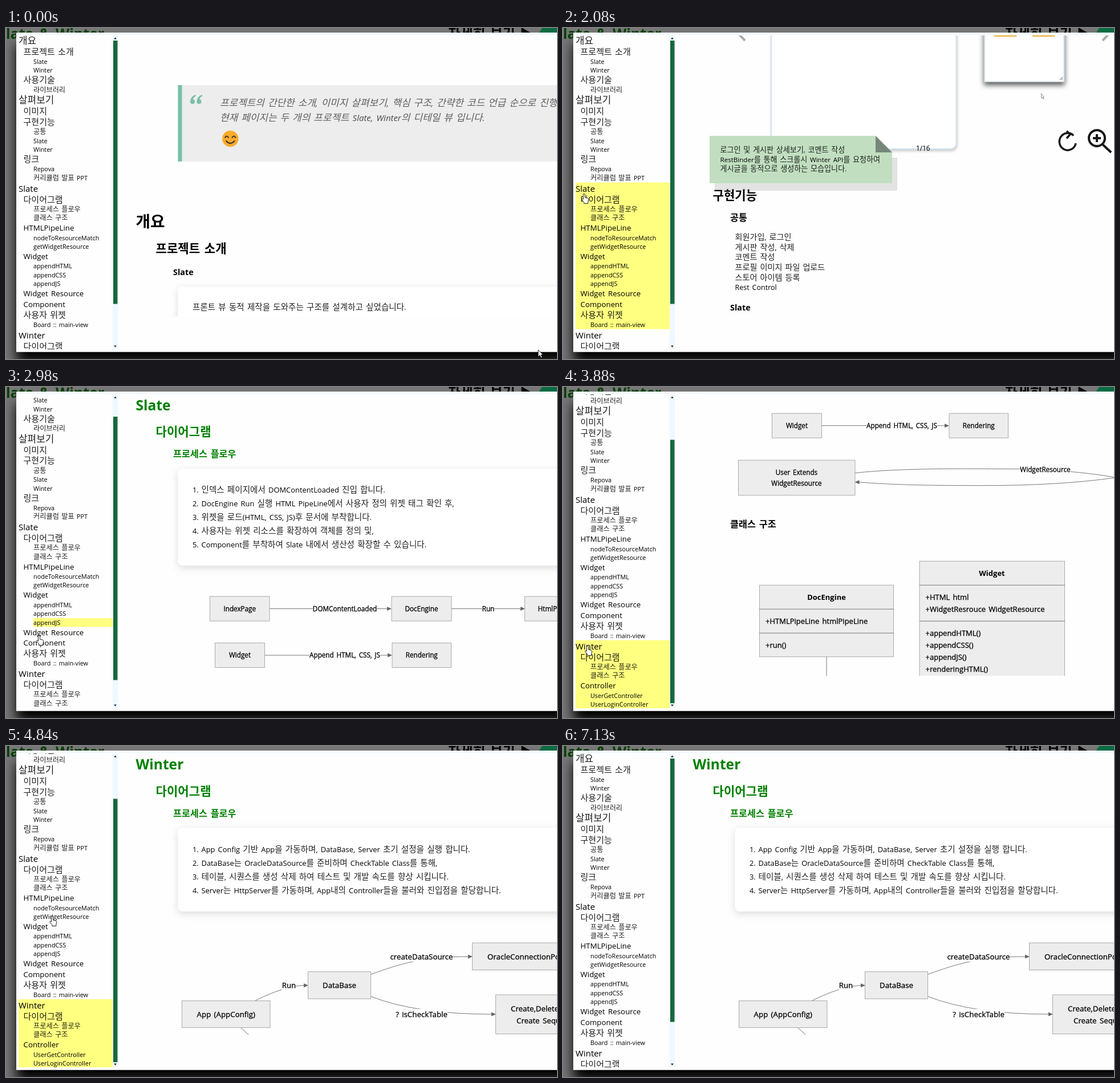
Recreate the animation shown at these times as an HTML page. Size 966x580 px, loop 7200 ms.

```html
<!DOCTYPE html>
<html lang="ko">
<head>
<meta charset="utf-8">
<style>
html, body { margin: 0; width: 100%; height: 100%; overflow: hidden; background: #777 }
svg { display: block; width: 966px; height: 580px }
text { font-family: "Open Sans", "Noto Sans", sans-serif; word-spacing: .14em; white-space: pre }
tspan { font-family: "Noto Sans CJK KR", "Noto Sans CJK", sans-serif; font-size: 1.13em }
text:not(.b) tspan { fill-opacity: .87 }
.b { font-weight: 700 }
.m { stroke: #000; stroke-width: .3px }
.q { font-style: italic; fill: #4a4a4a }
.mid { text-anchor: middle }
.green .head { fill: #008000 }
.card { fill: #fff; filter: drop-shadow(0 4px 7px #0002) }
.box { fill: #ededed; stroke: #aaa }
.line { fill: none; stroke: #777 }
.modal { fill: #fefefe; filter: drop-shadow(0 20px 11px #000) }
</style>
</head>
<body>
<svg id="stage" viewBox="0 0 966 580"></svg>
<script>
const LOOP = 7200, TICK = 72, ROW = [20.8, 18.7, 15.5], INDENT = [22, 30.5, 48], SIZE = [15, 13.3, 10.8];
const GALLERY = 1700, SLATE = 2500, WINTER = 7000;
const TO_SLATE = 1656, TO_WINTER = 3728;

const menu = `0개요|1프로젝트 소개|2Slate|2Winter|1사용기술|2라이브러리|0살펴보기|1이미지|1구현기능|2공통|2Slate|2Winter|1링크|2Repova|2커리큘럼 발표 PPT|0Slate|1다이어그램|2프로세스 플로우|2클래스 구조|1HTMLPipeLine|2nodeToResourceMatch|2getWidgetResource|1Widget|2appendHTML|2appendCSS|2appendJS|1Widget Resource|1Component|1사용자 위젯|2Board :: main-view|0Winter|1다이어그램|2프로세스 플로우|2클래스 구조|1Controller|2UserGetController|2UserLoginController`
  .split('|').map(s => ({ level: +s[0], label: s.slice(1) }));
let bottom = 11.6;
for (const m of menu) { m.top = bottom; bottom += ROW[m.level]; }
menu.forEach((m, i) => {
  const next = menu.slice(i + 1).find(n => n.level <= m.level);
  m.end = next ? next.top : bottom;
});

// y is the vertical middle of the line
const text = (x, y, size, s, cls = '') =>
  `<text x="${x}" y="${y + size * .37}" font-size="${size}" class="${cls}">${s.replace(/[가-힣]+/g, '<tspan>$&</tspan>')}</text>`;
const lines = (x, y, step, size, list, cls) => list.map((s, i) => text(x, y + i * step, size, s, cls)).join('');
const rect = (x, y, w, h, attr) => `<rect x="${x}" y="${y}" width="${w}" height="${h}" ${attr}/>`;
const path = (d, attr = 'class="line"') => `<path d="${d}" ${attr}/>`;
const group = (y, body, id = '') => `<g id="${id}" transform="translate(0 ${y})">${body}</g>`;
const h1 = (y, s) => text(227.5, y, 24.6, s, 'b head');
const h2 = (y, s) => text(262.5, y, 18.7, s, 'b head');
const h3 = (y, s) => text(293, y, 14.4, s, 'b head');
const card = (y, h) => rect(301.5, y, 760, h, 'rx="8" class="card"');
const node = (x, y, w, h, s = '', size = 11.7) =>
  rect(x, y, w, h, 'class="box"') + text(x + w / 2, y + h / 2, size, s, 'm mid');
const label = (x, y, s, size = 11.7) => text(x, y, size, s, 'm mid label');
const tip = (x, y, dir = 1) => path(`M${x} ${y}l${-8 * dir} -3.5v7z`, 'fill="#666"');
const steps = (y, list) => lines(327, y, 23.9, 12.9, list.map((_, i) => i + 1 + '.')) + lines(342.5, y, 23.9, 12.9, list);

const quoteMark = x => path(`M${x + 9} 117c-6 2-9 7-9 12a4 4 0 0 0 8 0a4 4 0 0 0-3.2-4q1-4 5.2-6z`, 'fill="#78c0a8"');

const intro = rect(301.5, 100, 700, 134, 'fill="#ededed"') + rect(301.5, 100, 7, 134, 'fill="#78c0a8"')
  + quoteMark(323) + quoteMark(334.5)
  + lines(375, 131, 26, 15, ['프로젝트의 간단한 소개, 이미지 살펴보기, 핵심 구조, 간략한 코드 언급 순으로 진행됩니다.',
    '현재 페이지는 두 개의 프로젝트 Slate, Winter의 디테일 뷰 입니다.'], 'q')
  + '<circle cx="393.3" cy="194" r="14.3" fill="#fcab2d"/>'
  + path('M384 192q3-5 6 0M396.500 192q3-5 6 0M386 198q7.300 8 14.600 0', 'fill="none" stroke="#3b3330" stroke-width="2" stroke-linecap="round"')
  + h1(340, '개요') + h2(387, '프로젝트 소개') + h3(428, 'Slate') + card(453, 110)
  + text(327, 489, 12.9, '프론트 뷰 동적 제작을 도와주는 구조를 설계하고 싶었습니다.')
  + h3(610, 'Winter') + card(635, 110) + h2(800, '사용기술') + h3(842, '라이브러리');

const gallery = h1(-400, '살펴보기') + h2(-352, '이미지')
  + rect(365, -300, 324.5, 512, 'rx="10" fill="#fff" stroke="#d3e2ee" stroke-width="2" style="filter:drop-shadow(1px 3px 2px #0003)"')
  + rect(739, -200, 139.5, 294, 'fill="#fff" stroke="#cfdde6" stroke-width="2" style="filter:drop-shadow(0 5px 5px #000a)"')
  + rect(755, -6, 41, 21, 'rx="3" fill="#f0a830"') + rect(822, -6, 41, 21, 'rx="3" fill="#f0a830"')
  + path('M871 91l5-5m-2 5l2-2', 'stroke="#555"')
  + path('M838.500 115v8l2-1.500 1.500 3 1-.5-1.500-3h2z', 'fill="#fff" stroke="#777" stroke-width=".8"')
  + path('M319 22L300 2 319-18M946 22L965 2 946-18', 'fill="none" stroke="#aaa" stroke-width="4"')
  + path('M895 188.500A14.500 15 0 1 0 899 202M883 180.500l6 6-6 7', 'fill="none" stroke="#161616" stroke-width="3.500"')
  + path('M946 204l15 14M936 186v14M929 193h14M950 193a14 14 0 1 0-28 0a14 14 0 1 0 28 0', 'fill="none" stroke="#161616" stroke-width="4"')
  + path('M577 227h9v58H266v-13h311z', 'fill="#e3e3e3"')
  + path('M257 189h291l29 29v54H257z', 'fill="#c1dfc0"') + path('M548 189l29 29h-29z', 'fill="#75877a"')
  + lines(275.5, 214, 16.3, 11.6, ['로그인 및 게시판 상세보기, 코멘트 작성', 'RestBinder를 통해 스크롤시 Winter API를 요청하여', '게시글을 동적으로 생성하는 모습입니다.'])
  + text(619, 211, 11.8, '1/16')
  + h2(294, '구현기능') + h3(333, '공통')
  + lines(301.5, 366.5, 17.6, 12.5, ['회원가입, 로그인', '게시판 작성, 삭제', '코멘트 작성', '프로필 이미지 파일 업로드', '스토어 아이템 등록', 'Rest Control'])
  + h3(490, 'Slate') + h3(590, 'Winter') + h2(690, '링크');

const slate = h1(31.5, 'Slate') + h2(79, '다이어그램') + h3(118, '프로세스 플로우') + card(143, 170)
  + steps(180.5, ['인덱스 페이지에서 DOMContentLoaded 진입 합니다.', 'DocEngine Run 실행 HTML PipeLine에서 사용자 정의 위젯 태그 확인 후,',
    '위젯을 로드(HTML, CSS, JS)후 문서에 부착합니다.', '사용자는 위젯 리소스를 확장하여 객체를 정의 및,', 'Component를 부착하여 Slate 내에서 생산성 확장할 수 있습니다.'])
  + path('M462 388.500H670M781 388.500H903M453 470H671') + tip(676, 388.5) + tip(910, 388.5) + tip(677, 470)
  + label(594, 388.5, 'DOMContentLoaded') + label(845.5, 388.5, 'Run') + label(594, 470, 'Append HTML, CSS, JS')
  + node(357.5, 367, 104.5, 43, 'IndexPage') + node(676, 367, 105, 43, 'DocEngine') + node(909.5, 367, 119, 43, 'HtmlPipeLine')
  + node(366.5, 448.5, 87, 43, 'Widget') + node(677, 448.5, 103.5, 43, 'Rendering')
  + path('M512 553C600 543 740 546 800 546 880 548 930 554 970 561C900 571 820 575 740 575 640 575 580 574 518 569') + tip(511.5, 569, -1)
  + label(845.5, 546.5, 'WidgetResource') + node(307.5, 530.5, 204.5, 61.5)
  + lines(409.5, 552, 19, 11.7, ['User Extends', 'WidgetResource'], 'm mid')
  + h3(643, '클래스 구조')
  + node(344.5, 749.5, 235, 125.5) + path('M344 791.500h236M344 833.500h236M462 875v90')
  + text(462, 771, 13, 'DocEngine', 'b mid') + text(355, 812.5, 13, '+HTMLPipeLine htmlPipeLine', 'm') + text(355, 854.5, 13, '+run()', 'm')
  + node(625, 707.5, 254.5, 210) + path('M625 749.500h255M625 812.500h255') + text(752, 729, 13, 'Widget', 'b mid')
  + lines(635.5, 771, 21, 13, ['+HTML html', '+WidgetResrouce WidgetResource'], 'm')
  + lines(635.5, 834, 21, 13, ['+appendHTML()', '+appendCSS()', '+appendJS()', '+renderingHTML()'], 'm')
  + menu.slice(19, 30).map((m, i) => (m.level == 1 ? h2 : h3)(1200 + i * 290, m.label)).join('');

const winter = h1(32, 'Winter') + h2(80, '다이어그램') + h3(119, '프로세스 플로우') + card(143, 147)
  + steps(181.5, ['App Config 기반 App을 가동하며, DataBase, Server 초기 설정을 실행 합니다.', 'DataBase는 OracleDataSource를 준비하며 CheckTable Class를 통해,',
    '테이블, 시퀀스를 생성 삭제 하여 테스트 및 개발 속도를 향상 시킵니다.', 'Server는 HttpServer를 가동하며, App내의 Controller들을 불러와 진입점을 할당합니다.'])
  + path('M437 446Q490 420 523 419.500M640 400C690 382 730 369 811 369M640 439Q720 470 852 470M412 494L440 519')
  + tip(530, 419.5) + tip(818, 369) + tip(859, 470)
  + label(496, 419.5, 'Run', 13.3) + label(728.5, 369, 'createDataSource', 13.3) + label(728.5, 470, '? isCheckTable', 13.3)
  + node(308.5, 446.5, 154.5, 47, 'App (AppConfig)', 13.3) + node(529.5, 395.5, 110, 47.5, 'DataBase', 13.3)
  + node(817.5, 345, 190, 47.5) + text(844, 369, 13.3, 'OracleConnectionPool', 'm')
  + node(858.5, 436, 190, 68.5) + text(885, 460, 13.3, 'Create,DeleteTable', 'm') + text(895, 481, 13.3, 'Create Sequence', 'm');

const stage = document.getElementById('stage');
stage.innerHTML = `<clipPath id="main">${rect(196, 13, 770, 493, '')}</clipPath><clipPath id="side">${rect(18, 13, 169, 550, '')}</clipPath>`
  + rect(0, 0, 966, 580, 'fill="#777"')
  + rect(18, 8, 990, 559.5, 'class="modal"')
  + `<g fill="#063f06">${text(0, 9.5, 25, 'late &amp; Winter', 'b')}</g>` + text(775, 10, 21, '자세히 보기 ▶', 'b')
  + path('M940 0h26v9H934z', 'fill="#0a6b42"')
  + rect(18, 8, 948, 559.5, 'fill="#fefefe"') + rect(18, 8, 948, 4.5, 'fill="#f3f9fd"')
  + rect(187, 13, 9.5, 550, 'fill="#f0f8ff"') + rect(188, 22, 7.5, 461.5, 'id="thumb" fill="#17683d"')
  + path('M189 19.500l2.500-3 2.500 3zM189 556.500l2.500 3 2.500-3z', 'fill="#123"')
  + `<g clip-path="url(#side)"><g id="list">${rect(0, 0, 0, 0, 'id="hover" fill="#ffff80"')}`
  + menu.map(m => text(INDENT[m.level], m.top + ROW[m.level] / 2, SIZE[m.level], m.label)).join('') + '</g></g>'
  + `<g clip-path="url(#main)"><g id="page">${group(0, intro) + group(GALLERY, gallery) + group(SLATE, slate, 'slate') + group(WINTER, winter, 'winter')}</g></g>`
  + path('', 'id="cursor" fill="#fff" stroke="#222" stroke-linejoin="round"');

// white plates keep the connector lines out of their labels
for (const node of stage.querySelectorAll('.label')) {
  const b = node.getBBox();
  node.insertAdjacentHTML('beforebegin', rect(b.x, b.y, b.width, b.height, 'fill="#fefefe"'));
}

const ARROW = 'M0 0v12l3-2.500 2 4.500 2-1-2-4.300h3.500z';
const HAND = 'M-1.500 1a1.400 1.400 0 0 1 3 0v5l5 1.200q1.500.5 1.300 2.300l-1 4.500v2.500h-7v-2l-4-5q-.5-2 1.500-1.300l1.200 1z';

const cursorKeys = [[0, 933, 564], [90, 933, 564], [560, 60, 100], [900, 50, 170], [1284, 38, 286], [2076, 37, 291], [2350, 40, 310],
  [2940, 58, 436], [3300, 50, 470], [3700, 42, 455], [3876, 43, 454], [4500, 45, 440], [4812, 81, 299], [5300, 90, 260],
  [5900, 80, 230], [6400, 70, 120], [6800, 120, 60], [6910, 240, 120], [7110, 945, 590], [LOOP, 945, 590]];
const listKeys = [[0, 0], [2600, 0], [2930, 35.7], [3100, 35.7], [3400, 84], [5300, 84], [5800, 0], [LOOP, 0]];
const hoverKeys = [[0, -1], [520, 4], [700, 6], [900, 8], [1150, 12], [1360, 15], [2400, 19], [2600, 22], [2900, 25], [3020, 26],
  [3200, 28], [3400, 30], [4900, 21], [5200, 19], [5500, 15], [5700, 12], [6100, 8], [6400, 6], [6650, 0], [6850, -1]];

function tween(keys, t) {
  const i = keys.findIndex(k => k[0] > t), a = keys[i - 1], b = keys[i];
  const p = (t - a[0]) / (b[0] - a[0]);
  return a.slice(1).map((v, n) => v + (b[n + 1] - v) * p);
}
function glide(t, start) {
  const p = Math.min(1, Math.max(0, (t - start) / 700));
  return p < .5 ? 2 * p * p : 1 - 2 * (1 - p) ** 2;
}
const el = id => document.getElementById(id);
const move = (id, x, y) => el(id).setAttribute('transform', `translate(${x} ${y})`);
const set = (id, attrs) => Object.entries(attrs).forEach(([k, v]) => el(id).setAttribute(k, v));

function draw(now) {
  // a screen recording: the picture holds still between ticks
  const t = Math.max(0, Math.floor((now % LOOP - 60) / TICK) * TICK + 60);
  const [scroll] = tween(listKeys, t), [x, y] = tween(cursorKeys, t);
  const item = menu[hoverKeys.findLast(k => k[0] <= t)[1]];
  move('list', 0, -scroll);
  move('thumb', 0, scroll * .84);
  move('page', 0, -SLATE * glide(t, TO_SLATE) - (WINTER - SLATE) * glide(t, TO_WINTER));
  move('cursor', x, y);
  set('cursor', { d: x < 187 ? HAND : ARROW });
  set('hover', item ? { x: INDENT[item.level], y: item.top, width: 187 - INDENT[item.level], height: item.end - item.top } : { width: 0 });
  el('slate').classList.toggle('green', t >= TO_SLATE && t < TO_WINTER);
  el('winter').classList.toggle('green', t >= TO_WINTER);
  requestAnimationFrame(draw);
}
requestAnimationFrame(draw);
</script>
</body>
</html>
```
